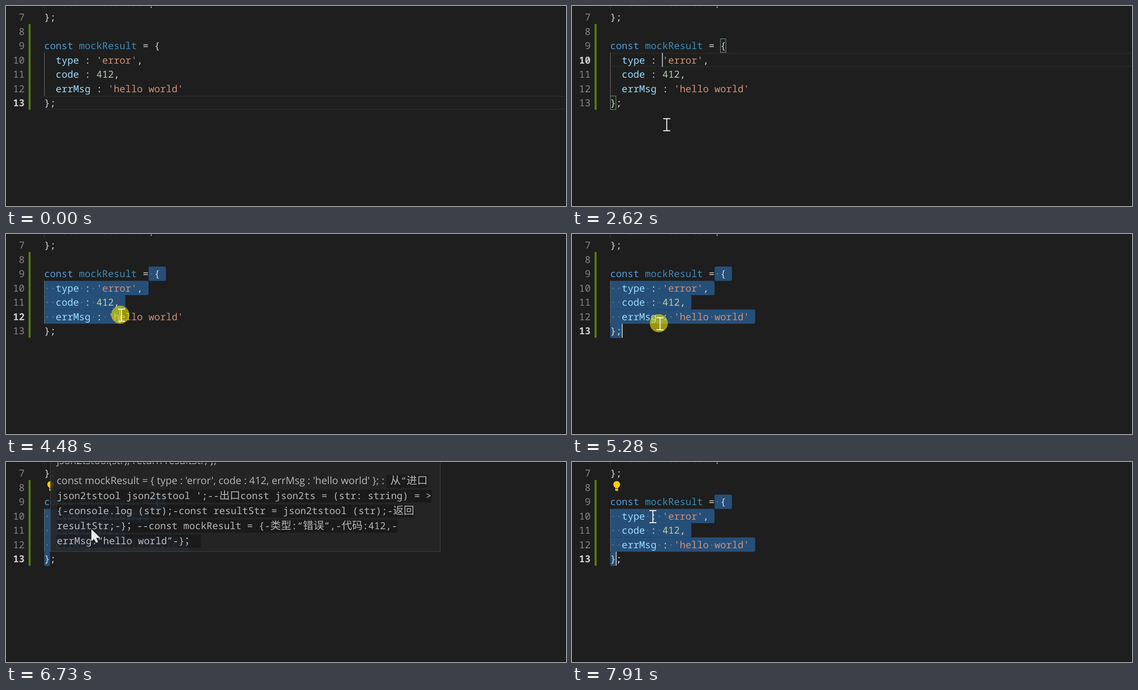
An HTML page for the animation above (8000 ms loop, 1115 by 399 pixels).

```html
<!DOCTYPE html>
<html lang="en">
<head>
<meta charset="utf-8">
<title>Editor hover</title>
<style>
  html, body { margin: 0; width: 100%; height: 100%; overflow: hidden; background: #1e1e1e; }
  svg { display: block; }
  text {
    font: 500 19.243px "Noto Sans Mono", "DejaVu Sans Mono", monospace;
    fill: #d4d4d4; white-space: pre; text-rendering: geometricPrecision;
  }
  .kw { fill: #569cd6; }
  .var { fill: #3f8bb4; }
  .prop { fill: #9cdcfe; }
  .str { fill: #ce9178; }
  .num { fill: #b5cea8; }
  .line-no { fill: #858585; text-anchor: end; }
  .line-no.active { fill: #d0d0d0; font-weight: 700; }
  .dots { fill: #e3e4e2; fill-opacity: .3; }
  #tip text { fill: #ccc; }
  #tip .prose { font: 20.1px "Open Sans", "Noto Sans", sans-serif; }
  .cjk { font: 300 21px "Noto Sans CJK SC", "Noto Sans CJK", sans-serif; }
</style>
</head>
<body>
<svg id="stage" width="1115" height="399" viewBox="0 0 1115 399">
  <rect width="1115" height="399" fill="#1e1e1e"/>
  <path id="lineMark" d="M77 1h1038M77 27h1038" stroke="#282828" stroke-width="2"/>
  <rect x="45" y="36" width="4" height="171" fill="#587c0c"/>
  <g id="selection" fill="#264f78"></g>
  <path d="M76.5 0v8" stroke="#404040"/>
  <path d="M76.5 93v86" stroke="#707070"/>
  <g id="brackets" fill="#006400" fill-opacity=".1" stroke="#888">
    <rect x="295.5" y="65.5" width="11" height="27"/>
    <rect x="76.5" y="179.5" width="11" height="27"/>
  </g>
  <g id="code"></g>
  <rect id="caret" width="2" height="28" fill="#aeafad"/>
  <g id="bulb">
    <circle cx="89" cy="44.8" r="6.8" fill="#fc0"/>
    <path d="M86 49h6v7q0 1.5-1.5 1.5h-3q-1.5 0-1.5-1.5z" fill="#fc0"/>
    <path d="M86 53.2h6" stroke="#1e1e1e"/>
  </g>
  <g id="tip"></g>
  <g id="mouse">
    <circle id="press" cx="-2.5" cy="-1" r="18" fill="#f5eb00" fill-opacity=".58"/>
    <path id="beam" d="M-7-12H7M0-12V12M-7 12H7" fill="none" stroke="#eee" stroke-width="2"/>
    <path id="arrow" d="M0-1v24l5.6-5 3.7 8.2 4-1.8-3.6-8h8z" fill="#eaeaea"/>
  </g>
  <path d="M0 .5H1114.5V398.5H0" fill="none" stroke="#161616"/>
</svg>
<script>
const LOOP = 8000, TICK = 131.8, LEAD = 18, BLINK = 500;
const LEFT = 76, CHAR = 11.546, WIDE = 21, ROW = 28.5;
const rowTop = n => 65 + (n - 9) * ROW;
const colX = c => LEFT + c * CHAR;
const $ = id => document.getElementById(id);

function add(parent, tag, attrs, content = '') {
  const el = document.createElementNS('http://www.w3.org/2000/svg', tag);
  for (const key in attrs) el.setAttribute(key, attrs[key]);
  el.textContent = content;
  return parent.appendChild(el);
}
const show = (el, on) => { el.style.display = on ? '' : 'none'; };

// Code lines, as [text, class] tokens
const field = (name, value, cls, end = '') => [['  '], [name, 'prop'], [' : '], [value, cls], [end]];
const lines = {
  6: [['  return resultStr;']],
  7: [['};']],
  8: [],
  9: [['const ', 'kw'], ['mockResult', 'var'], [' = {']],
  10: field('type', "'error'", 'str', ','),
  11: field('code', '412', 'num', ','),
  12: field('errMsg', "'hello world'", 'str'),
  13: [['};']]
};
const plain = {}, numbers = {}, marks = {};
for (const n in lines) {
  const y = rowTop(n) + 21;
  plain[n] = lines[n].map(token => token[0]).join('');
  numbers[n] = add($('code'), 'text', { x: 37, y, class: 'line-no' }, n);
  const text = add($('code'), 'text', { x: LEFT, y });
  for (const [part, cls = ''] of lines[n]) add(text, 'tspan', { class: cls }, part);
  if (n >= 9) marks[n] = {
    box: add($('selection'), 'rect', { y: rowTop(n), height: ROW, rx: 3 }),
    dots: add($('code'), 'text', { x: LEFT, y, class: 'dots' })
  };
}

// Hover card; its origin is the lower left corner
const isWide = ch => /[\u3000-\u9fff\uff00-\uffef]/.test(ch);
function codeSpan(x, y, str, pad) {
  const width = [...str].reduce((sum, ch) => sum + (isWide(ch) ? WIDE : CHAR), 0);
  add($('tip'), 'rect', { x: x - pad, y: y - 19, width: width + pad, height: 26, rx: 3, fill: '#0a0a0a', 'fill-opacity': .4 });
  const text = add($('tip'), 'text', { x, y });
  for (const part of str.split(/([\u3000-\u9fff\uff00-\uffef]+)/))
    if (part) add(text, 'tspan', { class: isWide(part) ? 'cjk' : '' }, part);
}
add($('tip'), 'rect', { x: .5, y: -300, width: 776, height: 299.5, fill: '#252526', stroke: '#454545' });
add($('tip'), 'text', { x: 13, y: -175, class: 'prose' }, 'json2tstool(str); return resultStr; };');
add($('tip'), 'text', { x: 13, y: -135, class: 'prose' },
  "const mockResult = { type : 'error', code : 412, errMsg : 'hello world' }; :");
codeSpan(677, -135, '从“进口', 8);
[
  "json2tstool json2tstool ';--出口const json2ts = (str: string) = >",
  '{-console.log (str);-const resultStr = json2tstool (str);-返回',
  'resultStr;-}；--const mockResult = {-类型:“错误”,-代码:412,-',
  'errMsg:“hello world”-}； '
].forEach((str, i) => codeSpan(13.3, -105 + i * 30, str, 0));

// Times below are counted in ticks
const hovers = [
  { from: 16, to: 20, x: 169, bottom: 122, fade: .88 },
  { from: 29, to: 30, x: 285, bottom: 65, fade: 1 },
  { from: 51, to: 57, x: 88, bottom: 179, fade: .88 }
];
const path = [
  [3, 822, 327], [6, 172, 123], [7, 172, 123], [8, 187, 112], [12, 187, 112],
  [14, 174, 150], [16, 174, 150], [19, 168, 249], [22, 230, 212], [24, 316, 86],
  [25, 316, 86], [27, 291, 79], [31, 291, 79], [32, 285, 108], [33, 255, 148],
  [34, 230, 162], [35, 260, 164], [36, 191, 164], [38, 191, 164], [39, 193, 169],
  [42, 140, 199], [45, 92, 182], [46, 90, 181], [49, 92, 128], [50, 92, 128],
  [51, 170, 135], [53, 150, 168], [54, 150, 168], [57, 48, 209], [60, 161, 109], [61, 161, 109]
];
const CLICK = 10, DRAG = 30, SETTLE = 45, DROP = 46, ANCHOR = { row: 9, col: 18 };
const clamp = (v, lo, hi) => Math.min(hi, Math.max(lo, v));

function mouseAt(tick) {
  const i = clamp(path.findIndex(p => p[0] > tick), 1, path.length - 1);
  const [t0, x0, y0] = path[i - 1], [t1, x1, y1] = path[i];
  const f = clamp((tick - t0) / (t1 - t0), 0, 1);
  return { x: x0 + (x1 - x0) * f, y: y0 + (y1 - y0) * f };
}

function caretAt(tick) {
  if (tick < CLICK) return { row: 13, col: 2 };
  if (tick < DRAG) return { row: 10, col: 9 };
  const { x, y } = mouseAt(Math.min(tick, DROP));
  const row = clamp(9 + Math.floor((y - rowTop(9)) / ROW), 9, 13);
  return { row, col: clamp(Math.round((x - 2 - LEFT) / CHAR), 0, plain[row].length) };
}

// The caret blinks from its last move on, and stays lit while it is dragged
function caretLit(tick) {
  if (tick < CLICK) return false;
  if (tick >= DRAG && tick < SETTLE) return true;
  const rest = (tick - (tick < DRAG ? CLICK : SETTLE)) * TICK + LEAD * 2;
  return Math.floor(rest / BLINK) % 2 === 0;
}

function drawSelection(caret, dragging) {
  for (const n in marks) {
    const row = +n, { box, dots } = marks[n];
    const start = row === ANCHOR.row ? ANCHOR.col : 0;
    const end = row === caret.row ? caret.col : plain[n].length + 1;
    const on = dragging && row <= caret.row && end > start;
    show(box, on);
    show(dots, on);
    if (!on) continue;
    box.setAttribute('x', colX(start));
    box.setAttribute('width', (end - start) * CHAR);
    dots.textContent = [...plain[n]].map((ch, i) => ch === ' ' && i >= start && i < end ? '·' : ' ').join('');
  }
}

function draw(tick) {
  const caret = caretAt(tick), dragging = tick >= DRAG;
  const selected = dragging && (caret.row > ANCHOR.row || caret.col > ANCHOR.col);
  drawSelection(caret, dragging);
  for (const n in numbers) numbers[n].classList.toggle('active', +n === caret.row);
  show($('lineMark'), !selected);
  $('lineMark').setAttribute('transform', `translate(0 ${rowTop(caret.row)})`);
  show($('brackets'), tick >= CLICK && !dragging);
  show($('caret'), caretLit(tick));
  $('caret').setAttribute('x', Math.round(colX(caret.col) - .5));
  $('caret').setAttribute('y', rowTop(caret.row));
  show($('bulb'), tick >= 49);

  const hover = hovers.find(h => tick >= h.from && tick < h.to);
  show($('tip'), hover);
  if (hover) {
    $('tip').setAttribute('transform', `translate(${hover.x} ${hover.bottom})`);
    $('tip').setAttribute('opacity', tick === hover.from ? hover.fade : 1);
  }

  const { x, y } = mouseAt(tick);
  const overTip = Boolean(hover && x > hover.x && y < hover.bottom);
  show($('mouse'), tick >= 3);
  $('mouse').setAttribute('transform', `translate(${x} ${y})`);
  show($('press'), (tick >= 9 && tick < 12) || (tick >= DRAG && tick <= DROP));
  show($('arrow'), overTip);
  show($('beam'), !overTip);
}

let shown = -1;
function loop() {
  const tick = Math.floor((performance.now() % LOOP + LEAD) / TICK);
  if (tick !== shown) draw(shown = tick);
  requestAnimationFrame(loop);
}
loop();
</script>
</body>
</html>
```
